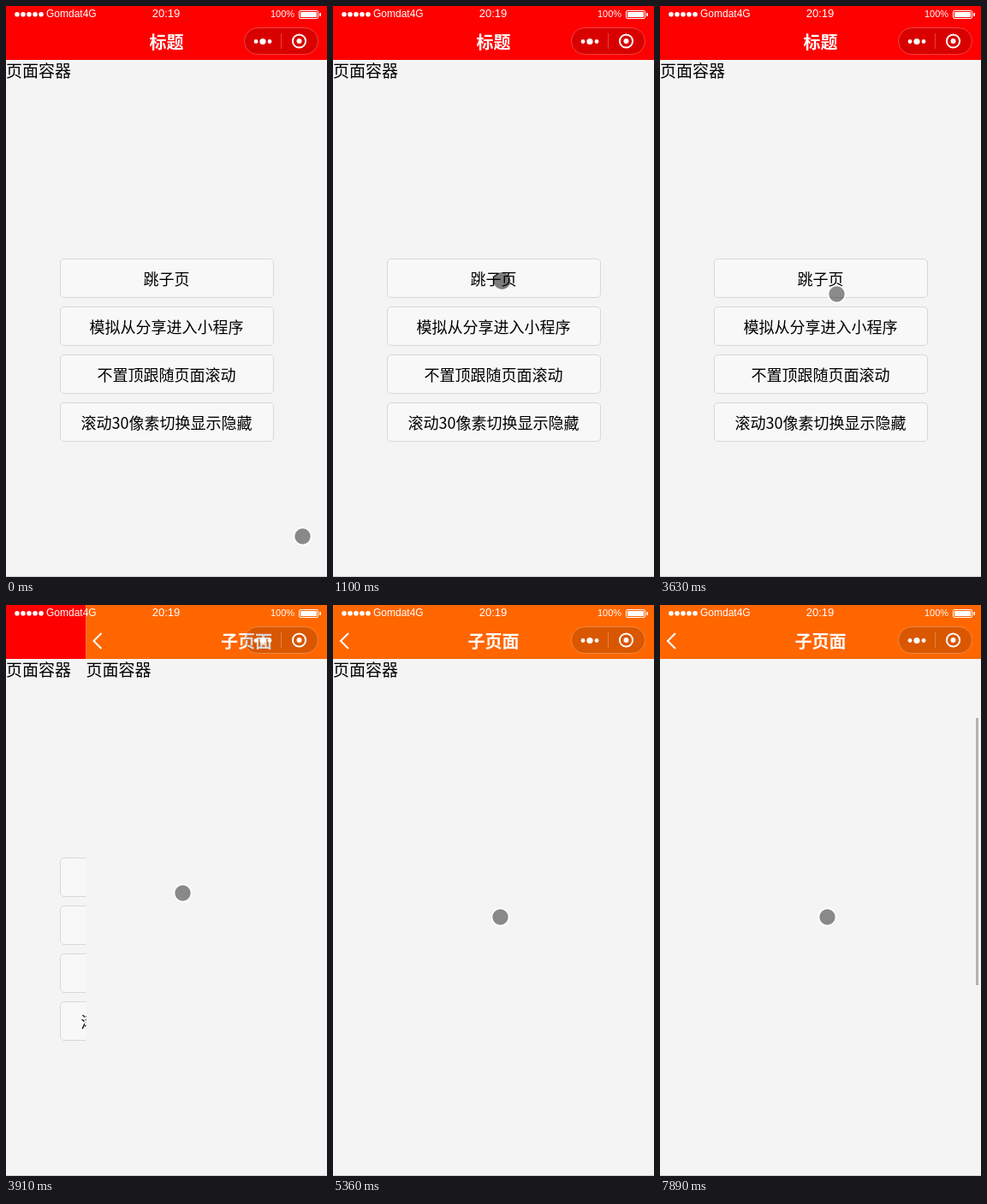
Recreate the animation shown at these times as an HTML page. Size 375 px wide and 667 px high, loop 8000 ms.

```html
<!DOCTYPE html>
<html lang="zh">
<head>
<meta charset="utf-8">
<style>
  html, body { margin: 0; width: 100%; height: 100%; overflow: hidden; background: #f4f4f4; }
  svg { display: block; }
  text { font-family: "Noto Sans CJK SC", "Noto Sans CJK", sans-serif; }
  .title { font-size: 20px; font-weight: 700; fill: #fff; text-anchor: middle; }
  .body { font-size: 19px; }
  .label { font-size: 18px; text-anchor: middle; }
  .status text { font-family: "Liberation Sans", Arial, sans-serif; fill: #fff; }
  .button rect { fill: #f8f8f8; stroke: rgba(0, 0, 0, .12); }
  .hover { opacity: .7; }
  .hover .band { fill: rgba(0, 0, 0, .1); }
  .hover .button rect { fill: #dedede; }
  .hover .button text { fill: rgba(0, 0, 0, .6); }
  .band { fill: none; }
  #cursor { fill: rgba(0, 0, 0, .44); stroke: #fff; stroke-width: 1.6; }
  #cursor.pressed { fill: rgba(0, 0, 0, .5); stroke: none; }
</style>
</head>
<body>
<svg width="375" height="667" viewBox="0 0 375 667">
  <g id="home">
    <rect width="375" height="667" fill="#f4f4f4"/>
    <text class="body" x="0" y="83">页面容器</text>
    <rect width="375" height="63" fill="#f00"/>
    <text class="title" x="187.5" y="49.5">标题</text>
    <g id="buttons"></g>
  </g>

  <g id="child">
    <rect width="375" height="667" fill="#f4f4f4"/>
    <text id="childBody" class="body" x="0" y="83">页面容器</text>
    <rect width="375" height="63" fill="#f60"/>
    <path d="M18 33L9 42L18 51" fill="none" stroke="#fff" stroke-width="2"/>
    <text class="title" x="187.5" y="49.5">子页面</text>
  </g>

  <rect y="666" width="375" height="1" fill="#d0d0d0"/>

  <g class="status" fill="#fff">
    <path d="M13 9.8h28.1" stroke="#fff" stroke-width="5.6" stroke-linecap="round" stroke-dasharray="0 7"/>
    <text x="47" y="13" font-size="12">Gomdat4G</text>
    <text x="187" y="13" font-size="13" text-anchor="middle">20:19</text>
    <text x="309" y="13" font-size="11">100%</text>
    <rect x="342.5" y="5.5" width="22" height="9" rx="1.5" fill="none" stroke="#fff"/>
    <rect x="344" y="7" width="19" height="6"/>
    <rect x="366" y="8" width="2" height="4" rx="1"/>
  </g>

  <g fill="#fff">
    <rect x="278.5" y="25.5" width="86" height="31" rx="15.5" fill="rgba(0,0,0,.15)" stroke="rgba(255,255,255,.25)"/>
    <path d="M321.5 32v18" stroke="rgba(255,255,255,.25)"/>
    <circle cx="292" cy="41.5" r="2.4"/>
    <circle cx="300" cy="41.5" r="3.6"/>
    <circle cx="308" cy="41.5" r="2.4"/>
    <circle cx="342.5" cy="41" r="7.6" fill="none" stroke="#fff" stroke-width="2"/>
    <circle cx="342.5" cy="41" r="3"/>
  </g>

  <rect id="scrollbar" x="369" width="3" height="312" fill="rgba(0,0,0,.27)"/>
  <circle id="cursor" r="10"/>
</svg>
<script>
const LOOP = 8000, VIEW = 667, BAR = 312;
const $ = id => document.getElementById(id);

// Each track holds its value until the next key: [time, ...values]
const cursorTrack = [
  [0, 346.5, 619.5], [150, 258.5, 549], [300, 229, 452], [425, 207, 352],
  [550, 197.5, 308], [820, 198, 311], [950, 198, 318.5], [1100, 197.5, 321],
  [3510, 171, 331], [3630, 206.5, 336.5], [4960, 205, 343], [5085, 200, 354],
  [5210, 197.5, 362], [5360, 195.5, 364.5]
];
const slideTrack = [[0, 375], [3910, 93.5], [4070, 0]];
const scrollTrack = [[0, 0], [7190, 34], [7320, 48], [7740, 49], [7890, 132]];

const at = (track, t) => track.findLast(key => key[0] <= t).slice(1);
const between = (t, from, to) => t >= from && t < to;

$('buttons').innerHTML = ['跳子页', '模拟从分享进入小程序', '不置顶跟随页面滚动', '滚动30像素切换显示隐藏']
  .map((label, i) => `<g transform="translate(0 ${285 + i * 56})">
    <rect class="band" width="375" height="56"/>
    <g class="button"><rect x="63.5" y="10.5" width="249" height="45" rx="4.5"/>
    <text class="label" x="187.5" y="40.5">${label}</text></g></g>`).join('');
const firstButton = $('buttons').firstElementChild;

function draw(t) {
  const [x, y] = at(cursorTrack, t);
  const [slide] = at(slideTrack, t);
  const [barTop] = at(scrollTrack, t);
  $('cursor').setAttribute('transform', `translate(${x} ${y})`);
  $('cursor').classList.toggle('pressed', between(t, 1100, 3080));
  firstButton.classList.toggle('hover', between(t, 2930, 3080));
  $('child').setAttribute('transform', `translate(${slide} 0)`);
  $('childBody').setAttribute('y', 83 - barTop * VIEW / BAR);
  $('scrollbar').setAttribute('y', barTop);
  $('scrollbar').setAttribute('visibility', barTop ? 'visible' : 'hidden');
}

const start = performance.now();
function tick() {
  draw((performance.now() - start) % LOOP);
  requestAnimationFrame(tick);
}
tick();
</script>
</body>
</html>
```
